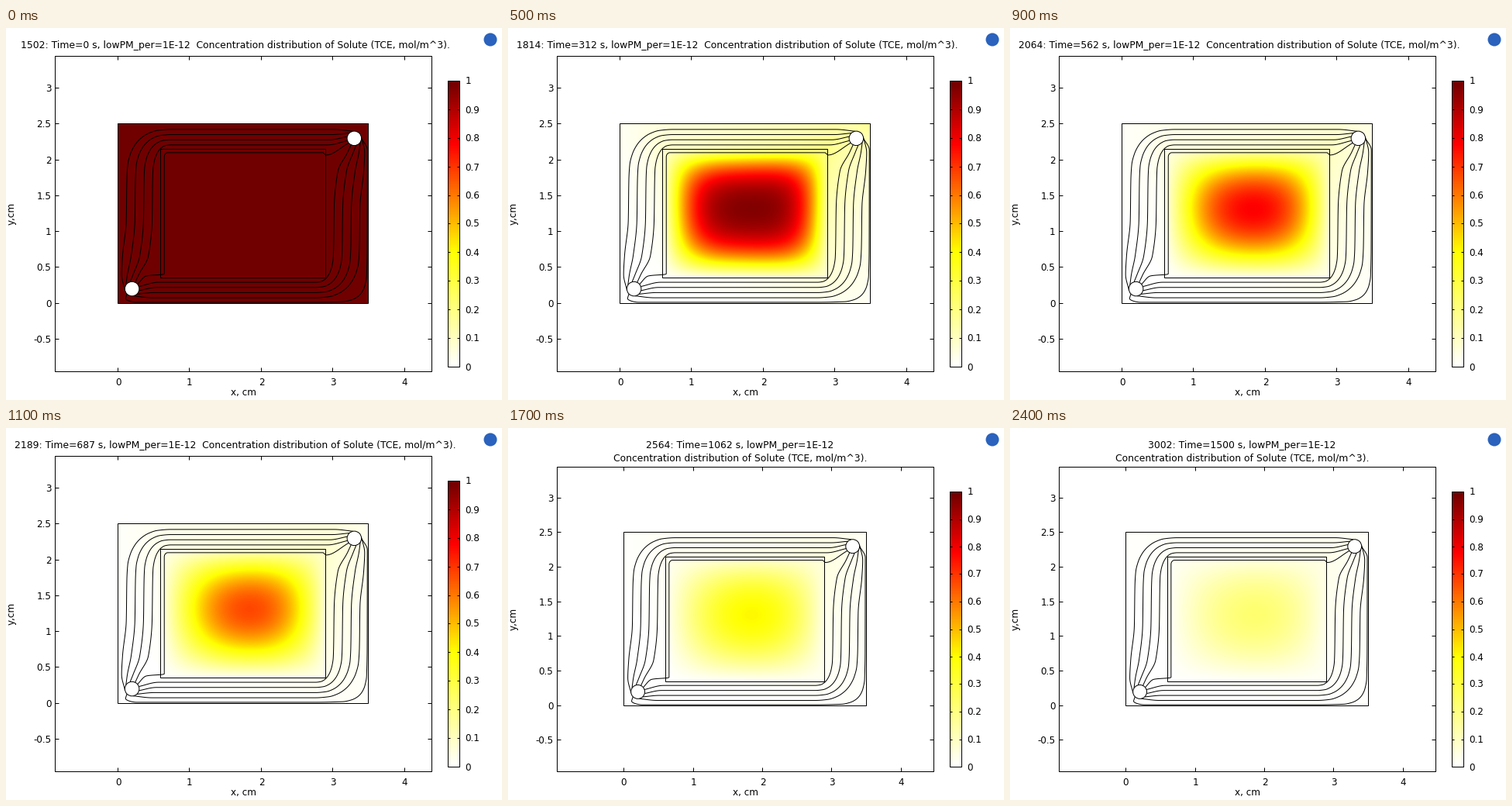
Animation of 640 by 480 pixels, one loop 2.5 s. Source, as a matplotlib script:

```python
import numpy as np
import matplotlib.pyplot as plt
from matplotlib.animation import FuncAnimation
from matplotlib.collections import LineCollection
from matplotlib.colors import LinearSegmentedColormap
from matplotlib.patches import Circle, Rectangle

W, H, DPI = 640, 480, 100
FRAMES, INTERVAL = 25, 100
DT_FRAME = 62.5                     # simulated seconds per frame
PX = 72 / DPI                       # one pixel in points

HEAT = LinearSegmentedColormap.from_list("heat", [
    (0, "#ffffff"), (0.4, "#ffff00"), (0.78, "#ff0000"), (1, "#700000")])

# Tank and low-permeability block, in cm
TANK = (0, 0, 3.5, 2.5)
BLOCK = (0.6, 0.35, 2.9, 2.15)
INLET, OUTLET, RADIUS = (0.2, 0.2), (3.3, 2.3), 0.1


def rim(well, deg):
    """Point on the edge of a well."""
    a = np.radians(deg)
    return well[0] + RADIUS * np.cos(a), well[1] + RADIUS * np.sin(a)


def bend(a, b, x1, h=1.72, p=2.5):
    """Superellipse from the column x=a at height h to (x1, b)."""
    f = np.linspace(0, np.pi / 2, 8)
    x = x1 - (x1 - a) * np.cos(f) ** (2 / p)
    y = h + (b - h) * np.sin(f) ** (2 / p)
    return list(zip(x, y))


def smooth(points, n=12):
    """Curve through the points without overshoot."""
    p = np.array(points, float)
    step = np.hypot(*np.diff(p, axis=0).T)[:, None]
    slope = np.diff(p, axis=0) / step
    a, b = slope[:-1], slope[1:]
    same = a * b > 0
    mid = np.where(same, 2 * a * b / np.where(same, a + b, 1), 0)
    tan = np.vstack([slope[:1], mid, slope[-1:]])
    s = np.linspace(0, 1, n)[:, None]
    parts = [(1 + 2 * s) * (1 - s) ** 2 * p[k] + s * (1 - s) ** 2 * h * tan[k]
             + s * s * (3 - 2 * s) * p[k + 1] - s * s * (1 - s) * h * tan[k + 1]
             for k, h in enumerate(step)]
    return np.vstack(parts)


def lane(k):
    """Streamline k around the upper left of the block, 0 is outermost."""
    a, b = 0.128 + 0.12 * k, 2.424 - 0.072 * k
    return smooth([rim(INLET, 190 - 42 * k), (0.055 + 0.08 * k, 0.4),
                   (a - 0.06, 0.66), (a - 0.008, 1.15)]
                  + bend(a, b, 0.74)
                  + [(3.02 - 0.03 * k, b), rim(OUTLET, 100 + 33 * k)])


def turned(path):
    """The flow is symmetric under a half turn of the tank."""
    return np.array(TANK[2:]) - path


def streams():
    lanes = [lane(k) for k in range(4)]
    hug = smooth([rim(INLET, 40), (0.4, 0.38), (0.65, 0.41)]
                 + bend(0.65, 2.1, 0.7, h=2.04, p=2)
                 + [(2.86, 2.1), (2.91, 2.067), rim(OUTLET, 220)])
    wall = smooth([rim(INLET, 180), (0.018, 0.36)]
                  + bend(0.02, 2.487, 0.73, p=4.6)
                  + [(3.24, 2.487), (3.39, 2.435), rim(OUTLET, 45)])
    return lanes + [turned(s) for s in lanes] + [hug, turned(wall)]


STREAMS = streams()

# Concentration on a grid
CELL = 0.05
gx, gy = np.meshgrid(np.arange(71) * CELL, np.arange(51) * CELL)
along = np.clip(((gx - 0.2) / 3.1 + (gy - 0.2) / 2.1) / 2, 0, 1)
gap = np.hypot(np.maximum(np.maximum(BLOCK[0] - gx, gx - BLOCK[2]), 0),
               np.maximum(np.maximum(BLOCK[1] - gy, gy - BLOCK[3]), 0))
wake_shape = along ** 1.6 * np.exp(-gap / 0.5)
corner_shape = np.exp(-np.hypot(gx - 3.5, gy - 2.5) / 0.25)


def channel(t):
    """Solute left in the flushed channel around the block."""
    front = 0.5 * (1 + np.tanh((along + 0.5 - t / 75) / 0.15))
    wake = 0.37 * (187 / max(t, 60)) * wake_shape
    corner = 0.4 * np.exp((187 - t) / 110) * corner_shape
    return np.clip(front + wake + corner, 0, 1)


def simulate():
    diff, vx, vy, sub = 3.05e-4, 1e-4, 0.6e-4, 32
    dt = DT_FRAME / sub
    inner = np.s_[8:43, 13:58]
    c = np.ones_like(gx)
    fields = [c]
    for k in range(1, (FRAMES - 1) * sub + 1):
        mid = c[inner]
        up, down = c[9:44, 13:58], c[7:42, 13:58]
        right, left = c[8:43, 14:59], c[8:43, 12:57]
        spread = diff * (up + down + left + right - 4 * mid) / CELL ** 2
        drift = (vx * (right - left) + vy * (up - down)) / (2 * CELL)
        new = channel(k * dt)
        new[inner] = mid + dt * (spread - drift)
        c = new
        if k % sub == 0:
            fields.append(c)
    return fields


FIELDS = simulate()

plt.rcParams["font.family"] = "DejaVu Sans"
fig = plt.figure(figsize=(W / DPI, H / DPI), dpi=DPI, facecolor="white")
ax = fig.add_axes([0, 0, 1, 1])


def text(x, y, s, size=12, **kw):
    ax.text(x, y, s, fontsize=size * PX, color="black", **kw)


def frame_box(x0, y0, x1, y1):
    box = Rectangle((x0, y0), x1 - x0, y1 - y0, fill=False, ec="black",
                    lw=PX, snap=True, zorder=3)
    ax.add_patch(box)
    return box


def lines(segments, **kw):
    ax.add_collection(LineCollection(segments, colors="black",
                                     linewidths=PX, zorder=4, **kw))


def draw(i):
    ax.clear()
    ax.axis("off")
    t = int(i * DT_FRAME)
    wrapped = t >= 1000
    ox, oy, k, top = ((149.2, 357.8, 89.4, 50) if wrapped
                      else (143.6, 354.6, 92.5, 36))
    L, R, B = 63, 549, 443

    def X(v):
        return ox + k * v

    def Y(v):
        return oy - k * v

    # Title
    head = f"{1502 + t}: Time={t} s, lowPM_per=1E-12"
    tail = "Concentration distribution of Solute (TCE, mol/m^3)."
    if wrapped:
        text(299.5, 26, head, 12.43, ha="center")
        text(299.5, 42, tail, 12.43, ha="center")
    else:
        text(296, 26, head + "  " + tail, 12.43, ha="center")

    # Field
    tank = frame_box(X(TANK[0]), Y(TANK[1]), X(TANK[2]), Y(TANK[3]))
    e = CELL / 2
    im = ax.imshow(FIELDS[i], cmap=HEAT, vmin=0, vmax=1, origin="lower",
                   extent=(X(-e), X(3.5 + e), Y(-e), Y(2.5 + e)),
                   interpolation="bilinear", interpolation_stage="data",
                   aspect="auto", zorder=1)
    im.set_clip_path(tank)
    frame_box(X(BLOCK[0]), Y(BLOCK[1]), X(BLOCK[2]), Y(BLOCK[3]))
    lines([np.column_stack([X(s[:, 0]), Y(s[:, 1])]) + 0.5 for s in STREAMS])
    for wx, wy in (INLET, OUTLET):
        ax.add_patch(Circle((X(wx) + 0.5, Y(wy) + 0.5), RADIUS * k, fc="white",
                            ec="black", lw=PX, zorder=5))

    # Axes
    frame_box(L, top, R, B)
    marks = []
    for v in range(5):
        x = round(X(v))
        marks += [[(x, B), (x, B - 5)], [(x, top), (x, top + 5)]]
        text(x + 0.5, 461, f"{v}", ha="center")
    for v in np.arange(-0.5, 3.1, 0.5):
        y = round(Y(v))
        marks += [[(L, y), (L + 5, y)], [(R, y), (R - 5, y)]]
        text(58.5, y + 5, f"{v:g}", ha="right")
    text(307, 474, "x, cm", ha="center")
    text(7.5, 246 if wrapped else 239, "y,cm", rotation=90,
         ha="center", va="center")

    # Colour bar
    bl, br, bt, bb = 570, 585, top + 32, 437
    ax.imshow(np.linspace(0, 1, 256)[:, None], cmap=HEAT, vmin=0, vmax=1,
              origin="lower", extent=(bl, br, bb, bt), aspect="auto",
              interpolation="bilinear", zorder=1)
    frame_box(bl, bt, br, bb)
    for n in range(11):
        y = round(bb - (bb - bt) * n / 10)
        marks += [[(bl, y), (bl + 3, y)], [(br, y), (br - 3, y)]]
        text(592.5, y + 4.5, f"{n / 10:g}")
    lines(marks, snap=True)

    ax.add_patch(Circle((625, 15), 8.5, fc="#2a62bd", ec="none"))
    ax.set_xlim(0, W)
    ax.set_ylim(H, 0)


anim = FuncAnimation(fig, draw, frames=FRAMES, interval=INTERVAL, repeat=True,
                     repeat_delay=0, cache_frame_data=False)
plt.show()
```
